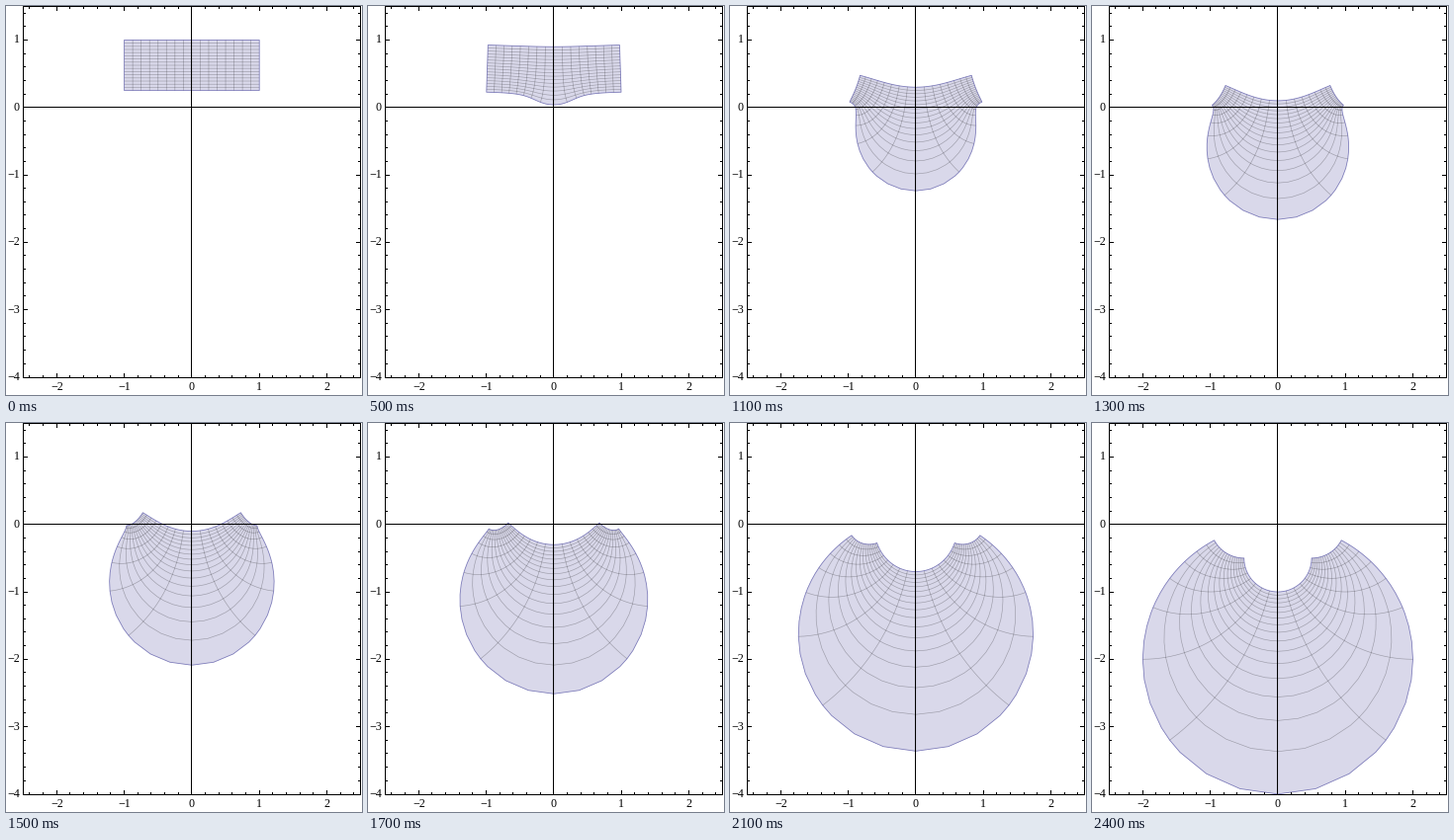
Recreate the animation shown at these times as a matplotlib script. Size 360x394 px, loop 2900 ms.

```python
import numpy as np
import matplotlib.pyplot as plt
from matplotlib.animation import FuncAnimation
from matplotlib.collections import LineCollection

W, H, DPI = 360, 394, 100
PX = 72 / DPI                      # one pixel in points
X0, Y0, UNIT = 187.9, 102.7, 68.3  # plane origin and scale in pixels
LEFT, RIGHT, TOP, BOTTOM = 17.5, 358.5, 0.5, 376.5
STEPS, HOLD, FRAMES = 20, 4, 29
BLUE = (0.2472, 0.24, 0.6)
FILL = (217 / 255, 216 / 255, 234 / 255)

fig = plt.figure(figsize=(W / DPI, H / DPI), dpi=DPI, facecolor="white")
ax = fig.add_axes([0, 0, 1, 1])
ax.set_xlim(0, W)
ax.set_ylim(H, 0)
ax.axis("off")


def to_px(z):
    return np.column_stack([X0 + UNIT * z.real, Y0 - UNIT * z.imag])


def morph(z, t):
    """Blend from the identity to the inversion 1/z."""
    return (1 - t) * z + t / z


# Sample points of the rectangle [-1, 1] x [1/4, 1]
xs = np.unique(np.round(np.r_[np.arange(-28, 29) / 28, np.arange(-8, 9) / 8], 9))
ys = np.linspace(0.25, 1, 65)
border = np.concatenate([xs + 0.25j, 1 + 1j * ys, xs[::-1] + 1j, -1 + 1j * ys[::-1]])
mesh = [x + 1j * ys for x in np.linspace(-1, 1, 17)[1:-1]]
mesh += [xs + 1j * y for y in np.linspace(0.25, 1, 17)[1:-1]]

region = plt.Polygon(to_px(border), closed=True, fc=FILL, ec="none",
                     snap=False, zorder=1)
grid = LineCollection([], colors=[(0, 0, 0, 0.27)], linewidths=0.65 * PX,
                      snap=False, zorder=2)
outline = plt.Polygon(to_px(border), closed=True, fill=False, snap=False,
                      ec=BLUE + (0.65,), lw=0.8 * PX, joinstyle="round", zorder=3)
ax.add_patch(region)
ax.add_collection(grid, autolim=False)
ax.add_patch(outline)


def draw_frame():
    col, row = int(X0) + 0.5, int(Y0) + 0.5
    lines = [[(x, 0), (x, BOTTOM + 0.5)] for x in (LEFT, col, RIGHT)]
    lines += [[(LEFT - 0.5, y), (RIGHT + 0.5, y)] for y in (TOP, row, BOTTOM)]
    for k in range(-12, 13):
        x, size = int(X0 + UNIT * k / 5) + 0.5, 4.5 if k % 5 == 0 else 2.5
        lines += [[(x, BOTTOM), (x, BOTTOM - size)], [(x, TOP), (x, TOP + size)]]
    for k in range(-19, 8):
        y, size = int(Y0 - UNIT * k / 5) + 0.5, 4.5 if k % 5 == 0 else 2.5
        lines += [[(LEFT, y), (LEFT + size, y)], [(RIGHT, y), (RIGHT - size, y)]]
    # Coordinates already sit on pixel centres, so snapping would shift them
    ax.add_collection(LineCollection(lines, colors="black", linewidths=PX,
                                     capstyle="butt", snap=False, zorder=4),
                      autolim=False)


def draw_labels():
    style = dict(family="Liberation Serif", size=12 * PX, color="black",
                 va="baseline", zorder=5)
    for n in range(-4, 3):
        text = str(n).replace("-", "\u2212")
        if n >= -2:
            ax.text(X0 + UNIT * n, 389, text, ha="center", **style)
        if n <= 1:
            ax.text(14, round(Y0 - UNIT * n) + 3, text, ha="right", **style)


def update(i):
    t = min(max(i - HOLD, 0), STEPS) / STEPS
    edge = to_px(morph(border, t))
    region.set_xy(edge)
    outline.set_xy(edge)
    grid.set_segments([to_px(morph(z, t)) for z in mesh])
    return region, grid, outline


draw_frame()
draw_labels()
anim = FuncAnimation(fig, update, frames=FRAMES, interval=100, repeat=True,
                     repeat_delay=0, blit=False)
plt.show()
```
